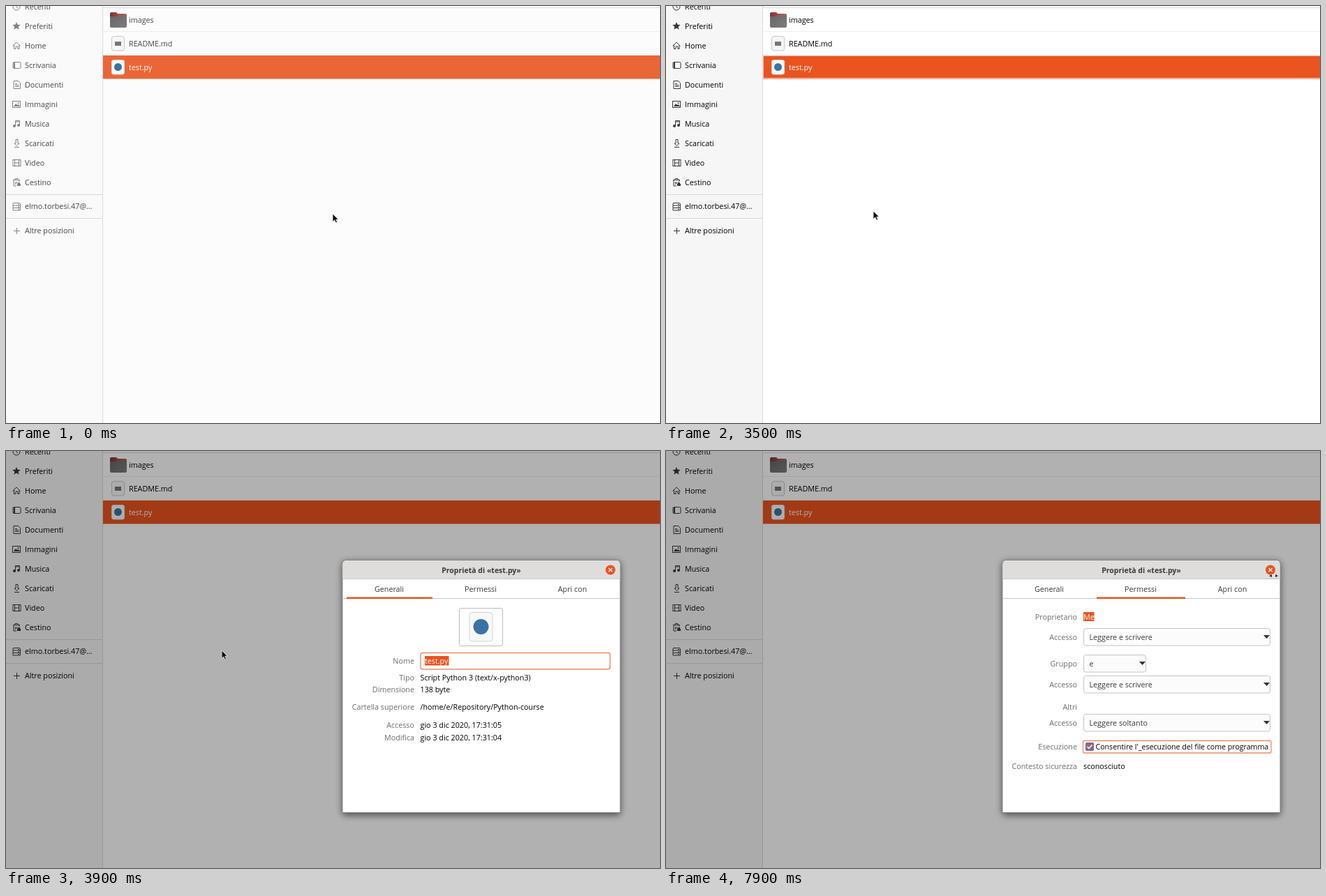
Animation of 937x598 px, one loop 8000 ms. Source, as an HTML page:

```html
<!DOCTYPE html>
<html lang="it">
<head>
<meta charset="utf-8">
<style>
html, body { margin: 0; width: 100%; height: 100%; overflow: hidden; background: #fff; }
svg { display: block; width: 937px; height: 598px; font: 10.75px "Open Sans", "Noto Sans", sans-serif; }
text { white-space: pre; }
#icons { fill: none; stroke: var(--icon); stroke-width: 1; }
#icons .solid { fill: var(--icon); stroke: none; }
</style>
</head>
<body>
<svg id="stage" viewBox="0 0 937 598">
  <defs>
    <linearGradient id="tab"><stop stop-color="#7d2d43"/><stop offset="1" stop-color="#e8602c"/></linearGradient>
    <linearGradient id="folder" x2="1" y2="1"><stop stop-color="#666"/><stop offset="1" stop-color="#7d7d7d"/></linearGradient>
    <filter id="blur" x="-10%" y="-10%" width="120%" height="120%"><feGaussianBlur stdDeviation="5"/></filter>
  </defs>
  <rect id="main" width="937" height="598"/>
  <rect id="side" width="138" height="598"/>
  <path d="M138.5 0V598M0 270.5H138M0 304.5H138M139 2.5H937" stroke="#d9d9d9"/>
  <path d="M139 36.5H937M139 70.5H937" stroke="#efefef"/>
  <g id="places" fill="currentColor"></g>
  <g id="icons">
    <circle cx="15" cy="1" r="5"/><path d="M15-2V1.5L17 3"/>
    <path class="solid" d="M15 23l1.6 3.8 4.1.3-3.1 2.7 1 4-3.6-2.2-3.6 2.2 1-4-3.1-2.7 4.1-.3z"/>
    <path d="M9.5 57.5L15 52l5.5 5.5M11.5 56V61.5H14V58H17V61.5H19V56"/>
    <rect x="10" y="80.5" width="11" height="9" rx="1.5"/><path d="M12 81V89" stroke-width="2"/>
    <path d="M11 107.500H17.500L20.500 110.500V118.500H11ZM13 111.500H16M13 113.500H18.500M13 115.500H18.500"/>
    <rect x="9.500" y="136.500" width="11" height="9"/><path class="solid" d="M11 144l3-4 2 2 1.500-1L20 144z"/><circle class="solid" cx="17.500" cy="139" r="1"/>
    <path d="M13.500 172V164.500H19.500V171M13.500 166H19.500"/><circle class="solid" cx="12" cy="172" r="2"/><circle class="solid" cx="18" cy="171" r="2"/>
    <path d="M14 191.500H17V197H19L15.500 200.500L12 197H14ZM12 202.500H19"/>
    <rect x="10" y="220.500" width="11" height="9"/><path d="M12.500 221V229M18.500 221V229M12.500 225H18.500"/>
    <path d="M10 249.500H20M13 249V247.500H17V249M11 250V258H15M19 250V252M13.500 252V256M15.500 252V255"/><path class="solid" d="M16 258V255H17V253H20V255H21V258Z"/>
    <path d="M10.500 282.500H19.500L20.500 284V286H10V284ZM10 286V289.500H20.500V286M10 289.500V293H20.500V289.500M17 284.500H19M17 288H19M17 291.500H19"/>
    <path d="M15.500 318V327M11 322.500H20"/>
  </g>
  <path d="M149 13V11Q149 9 151 9H158L160 11H171Q173 11 173 13V18H149Z" fill="url(#tab)"/>
  <path d="M149 15H158L161 12.500H173V29Q173 31 171 31H151Q149 31 149 29Z" fill="url(#folder)"/>
  <rect x="151.500" y="43.500" width="18" height="20.500" rx="3" fill="#f7f7f7" stroke="#c6c6c6"/>
  <rect x="156" y="51" width="9" height="6" fill="#777"/>
  <rect id="row" x="139" y="71" width="798" height="33.500"/>
  <rect id="rowRing" x="139.500" y="71.500" width="800" height="32" fill="none" stroke="#f6b8a0"/>
  <rect x="151.500" y="77.500" width="18" height="20.500" rx="2.500" fill="#fafafa" stroke="#ddd"/>
  <circle cx="160.500" cy="87.500" r="5.500" fill="#3973a6"/>
  <g id="files"></g>
  <g id="menu">
    <rect x="250" y="95" width="214" height="215" rx="5" opacity=".25" filter="url(#blur)"/>
    <rect x="250.500" y="93.500" width="212" height="214" rx="4" fill="#fafafa" stroke="#9a9a9a"/>
    <rect id="hover" x="251" width="211" height="18.500" fill="#e4e4e4"/>
    <path d="M251 115.500H462M251 134.500H462M251 172.500H462M251 209.500H462M251 228.500H462M251 247.500H462M251 266.500H462M251 285.500H462" stroke="#dcdcdc"/>
    <rect x="275.500" y="99.500" width="10" height="11" rx="1" fill="#fff" stroke="#999"/>
    <path d="M278 107.500L284 101.500" stroke="#3465c0" stroke-width="2"/>
    <g id="items"></g>
  </g>
  <rect id="dim" width="937" height="598"/>
  <g id="dialog">
    <rect x="481" y="158" width="400" height="365" rx="6" opacity=".5" filter="url(#blur)"/>
    <path d="M482 518.500V162.500Q482 156.500 488 156.500H874Q880 156.500 880 162.500V518.500Z" fill="#fff" stroke="#858585"/>
    <path d="M482.500 184V163Q482.500 157 488 157H874Q879.500 157 879.500 163V184Z" fill="#dedddc"/>
    <path d="M482 183.500H880M482 211.500H880" stroke="#c9c9c9"/>
    <circle cx="866" cy="170.500" r="7" fill="#e95420"/>
    <path d="M863.500 168l5 5m0-5l-5 5" stroke="#fff" stroke-width="1.200"/>
    <rect id="tabHover" x="617" y="184" width="127" height="27" fill="#f4f4f4"/>
    <rect id="line1" x="488" y="209.500" width="123" height="2.500" fill="#e95420"/>
    <rect id="line2" x="617" y="209.500" width="127" height="2.500"/>
    <g id="tabs"></g>
    <g id="general"></g>
    <g id="perms"></g>
  </g>
  <path id="arrow" d="M0 0V11.500L2.700 9L4.600 13L6.600 12.200L4.800 8.200H8.200Z" fill="#111" stroke="#fff" stroke-width=".7"/>
  <path id="resize" d="M864 179l4-2.500v5zM877 179l-4-2.500v5z" fill="#111" stroke="#fff" stroke-width=".4"/>
</svg>
<script>
const $ = id => document.getElementById(id);
const label = (x, y, s, fill = 'currentColor', attrs = '') =>
  `<text x="${x}" y="${y}" fill="${fill}" ${attrs}>${s}</text>`;
const END = 'text-anchor="end"', MID = 'text-anchor="middle"';
const GREY = '#6c6c6c', DARK = '#3a3a3a', ORANGE = '#e95420';

$('places').innerHTML = ['Recenti', 'Preferiti', 'Home', 'Scrivania', 'Documenti', 'Immagini', 'Musica',
  'Scaricati', 'Video', 'Cestino'].map((s, i) => label(27, 4.5 + 28 * i, s)).join('') +
  label(27, 291, 'elmo.torbesi.47@…') + label(27, 326, 'Altre posizioni');

$('files').innerHTML = label(176, 24, 'images') + label(176, 57.5, 'README.md') + label(176, 91.5, 'test.py', '#fff');

const rowY = i => 105 + 19.05 * i;
$('items').innerHTML = [['Apri con Editor di testo', 'Invio'], ['Apri con altra applicazione', ''],
  ['Taglia', 'Ctrl+X'], ['Copia', 'Ctrl+C'], ['Sposta su…', ''], ['Copia su…', ''],
  ['Sposta nel cestino', 'Canc'], ['Rinomina…', 'F2'], ['Comprimi…', ''], ['Invia a…', ''],
  ['Proprietà', 'Ctrl+I']].map(([s, key], i) =>
  label(i ? 274 : 290.5, rowY(i) + 4, s, DARK) + label(455.5, rowY(i) + 4, key, '#929292', END)).join('');

$('tabs').innerHTML = label(681, 174.5, 'Proprietà di «test.py»', DARK, MID + ' font-weight="700" font-size="10.5"') +
  [[549, 'Generali'], [680, 'Permessi'], [811.5, 'Apri con']].map(([x, s]) => label(x, 201.5, s, DARK, MID)).join('');

$('general').innerHTML = `
  <rect x="649.5" y="225.500" width="62" height="54" rx="2.500" fill="#fdfdfd" stroke="#bdbdbd"/>
  <rect x="664" y="231.500" width="33" height="41.500" rx="4" fill="#f8f8f8" stroke="#d4d4d4"/>
  <circle cx="680.500" cy="252" r="11" fill="#3973a6"/>
  <rect x="594" y="289.500" width="271.500" height="23.500" rx="3" fill="#fff" stroke="#ee8c68" stroke-width="1.500"/>
  <rect x="600" y="294" width="34.500" height="13.500" fill="${ORANGE}"/>` + label(600, 304.5, 'test.py', '#fff') +
  [[304.5, 'Nome', ''], [328.5, 'Tipo', 'Script Python 3 (text/x-python3)'], [345.5, 'Dimensione', '138 byte'],
   [371, 'Cartella superiore', '/home/e/Repository/Python-course'], [397, 'Accesso', 'gio 3 dic 2020, 17:31:05'],
   [414.5, 'Modifica', 'gio 3 dic 2020, 17:31:04']].map(([y, name, value]) =>
    label(585, y, name, GREY, END) + label(593.5, y, value, '#000')).join('');

const combo = (y, w, s) => `
  <rect x="598.500" y="${y}.500" width="${w}" height="24.500" rx="3" fill="#fcfcfc" stroke="#c4c4c4"/>
  <path d="M${594 + w - 5} ${y + 10}h9l-4.500 5z" fill="#333"/>` + label(606.5, y + 16.5, s, DARK);
$('perms').innerHTML = [[241.5, 'Proprietario'], [271, 'Accesso'], [309, 'Gruppo'], [338.5, 'Accesso'],
  [371, 'Altri'], [394, 'Accesso'], [428, 'Esecuzione'], [456, 'Contesto sicurezza']]
  .map(([y, s]) => label(589, y, s, GREY, END)).join('') + `
  <rect x="598" y="231" width="15.500" height="13" fill="${ORANGE}"/>` + label(598, 241.5, 'Me', '#fff') +
  combo(254, 267, 'Leggere e scrivere') + combo(292, 89, 'e') +
  combo(322, 267, 'Leggere e scrivere') + combo(377, 267, 'Leggere soltanto') + `
  <rect id="ring" x="597.500" y="415.500" width="269.500" height="17.500" rx="2" fill="none" stroke="#ee8c68" stroke-width="1.300"/>
  <rect id="box" x="601.500" y="418.500" width="11" height="11" rx="2" fill="#fff" stroke="#b4b4b4"/>
  <g id="check"><rect x="601" y="418" width="12" height="12" rx="2" fill="#8b6784"/>
  <path d="M603.500 424l2.500 2.500 4.500-5" fill="none" stroke="#fff" stroke-width="1.500"/></g>` +
  label(615.5, 428, "Consentire l'_esecuzione del file come programma", '#000', 'font-size="10.6"') +
  label(598, 456, 'sconosciuto', '#000');

// Pointer stops: time, x, y
const stops = [[400, 468, 298], [500, 450, 278], [800, 325, 158], [1100, 250, 92], [2200, 250, 92], [2300, 257, 125],
  [2400, 268, 182], [2500, 268, 182], [2800, 288, 255], [3000, 297, 294], [3700, 297, 294], [3900, 309, 286],
  [4300, 526, 230], [4500, 622, 204], [4700, 666, 193], [5700, 666, 193], [5800, 679, 238], [5900, 645, 350],
  [6000, 608, 403], [6100, 675, 387], [6200, 675, 387], [6300, 607, 424], [6400, 607, 424], [6500, 609, 429],
  [7400, 609, 429], [7600, 750, 315], [7700, 860, 205], [7800, 917, 146], [7900, 870, 179]];

const ramp = (t, a, b) => Math.min(1, Math.max(0, (t - a) / (b - a)));
const mix = (a, b, k) => a + (b - a) * k;
const rgb = (a, b, k) => `rgb(${a.map((v, i) => Math.round(mix(v, b[i], k)))})`;
const grey = (a, b, k) => rgb([a, a, a], [b, b, b], k);
const show = (id, on) => $(id).style.display = on ? '' : 'none';

function pointer(t) {
  const i = stops.findIndex(s => s[0] >= t);
  if (i < 1) return stops[0].slice(1);
  const [a, b] = [stops[i - 1], stops[i]], k = ramp(t, a[0], b[0]);
  return [mix(a[1], b[1], k), mix(a[2], b[2], k)];
}

function draw(t) {
  const [x, y] = pointer(t), focus = ramp(t, 1700, 2000);
  $('stage').style.color = grey(72, 0, focus);
  $('stage').style.setProperty('--icon', grey(130, 55, focus));
  $('main').style.fill = grey(252, 255, focus);
  $('side').style.fill = grey(250, 246, focus);
  $('row').style.fill = rgb([235, 102, 55], [233, 84, 32], focus);
  show('rowRing', t >= 3500 && t < 3700);

  show('menu', t >= 1900 && t < 3500);
  show('hover', t >= 2300);
  $('hover').setAttribute('y', rowY(Math.round((y - 105) / 19.05)) - 9);

  $('dim').style.opacity = 0.306 * ramp(t, 3550, 3850);
  show('dialog', t >= 3600);
  const grow = 1 - (1 - ramp(t, 3550, 3650)) ** 2;
  $('dialog').setAttribute('transform', `translate(0 ${337.5 * (1 - grow)}) scale(1 ${grow})`);

  const page2 = t >= 5400;
  show('tabHover', t >= 4600 && !page2);
  show('line1', !page2);
  show('line2', t >= 4600);
  $('line2').style.fill = rgb([205, 205, 205], [233, 84, 32], ramp(t, 5000, 5200));
  show('general', !page2);
  show('perms', page2);
  show('ring', t >= 6900);
  $('box').style.fill = t >= 6900 ? '#ddd' : '#fff';
  $('check').style.opacity = ramp(t, 7000, 7300);

  show('arrow', t < 7900);
  show('resize', t >= 7900);
  $('arrow').setAttribute('transform', `translate(${Math.round(x)} ${Math.round(y)})`);
}

const start = performance.now();
(function tick() {
  draw(Math.floor((performance.now() - start) % 8000 / 100) * 100);
  requestAnimationFrame(tick);
})();
</script>
</body>
</html>
```
